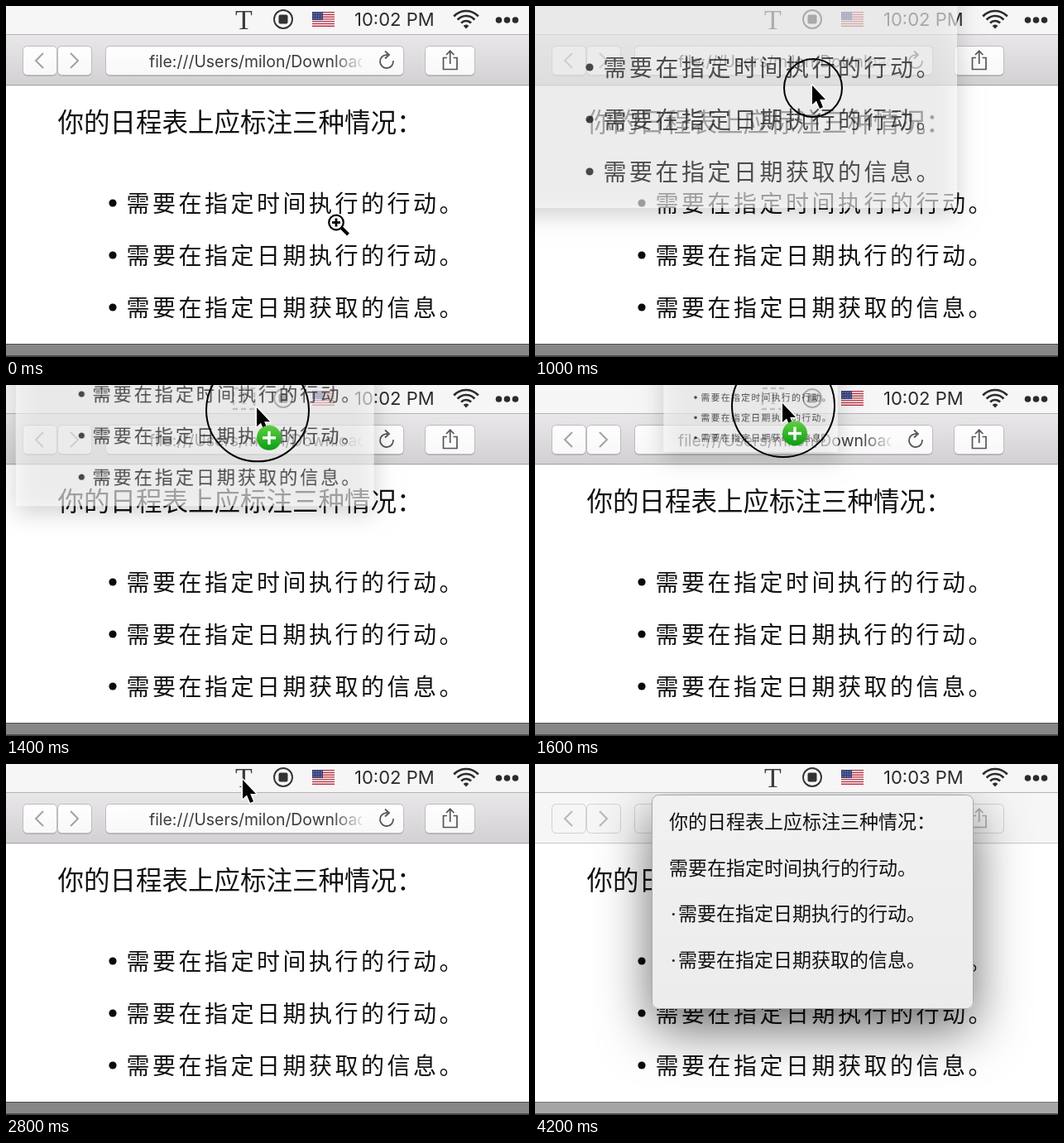
An HTML page with a canvas that plays this animation: 632 px wide and 424 px high, repeating every 4600 ms.

```html
<!DOCTYPE html>
<html lang="zh-CN">
<head>
<meta charset="utf-8">
<title>Drag to recognise text</title>
<style>
html, body { margin: 0; width: 100%; height: 100%; overflow: hidden; background: #fff; }
canvas { display: block; width: 632px; height: 424px; }
</style>
</head>
<body>
<canvas id="stage" width="632" height="424"></canvas>
<script>
const W = 632, H = 424, LOOP = 4600, STEP = 100;
const CJK = '"Noto Sans CJK SC", "Noto Sans CJK", sans-serif';
const UI = 'Inter, sans-serif';
const TITLE = '你的日程表上应标注三种情况：';
const ITEMS = ['需要在指定时间执行的行动。', '需要在指定日期执行的行动。', '需要在指定日期获取的信息。'];
const g = document.getElementById('stage').getContext('2d');

// time, pointer x y, first bullet of the dragged copy x y, its scale, ring radius
const DRAG = [
  [100, 398, 260, 129, 238, 1, 35],
  [600, 398, 203, 129, 181, 1, 35],
  [700, 398, 203, 129, 181, 1, 35],
  [1000, 335, 96, 66, 74, 1, 35],
  [1200, 312, 42, 45, 20, 1, 62],
  [1300, 305, 30, 40, 9, 1, 62],
  [1600, 299, 22, 194, 15, 0.387, 62],
  [1900, 286, 14, 187, 10, 0.387, 62],
  [2400, 286, 14, 187, 10, 0.387, 62]
];

function pose(t) {
  const i = Math.max(1, DRAG.findIndex(k => k[0] >= t));
  const a = DRAG[i - 1], b = DRAG[i];
  const u = (t - a[0]) / (b[0] - a[0]);
  return a.map((v, n) => v + (b[n] - v) * u);
}

function box(c, x, y, w, h, r, fill, line) {
  c.beginPath();
  c.roundRect(x, y, w, h, r);
  if (fill) { c.fillStyle = fill; c.fill(); }
  if (line) { c.strokeStyle = line; c.lineWidth = 1; c.stroke(); }
}

function disc(x, y, r, fill) {
  g.beginPath();
  g.arc(x, y, r, 0, 7);
  g.fillStyle = fill;
  g.fill();
}

function ring(x, y, r, width, color) {
  g.beginPath();
  g.arc(x, y, r, 0, 7);
  g.lineWidth = width;
  g.strokeStyle = color;
  g.stroke();
}

function path(points, width, color) {
  g.beginPath();
  points.forEach(([x, y]) => g.lineTo(x, y));
  g.lineWidth = width;
  g.strokeStyle = color;
  g.stroke();
}

function text(c, s, x, y, font, fill) {
  c.font = font;
  c.fillStyle = fill;
  c.fillText(s, x, y);
}

function vertical(y0, y1, a, b) {
  const f = g.createLinearGradient(0, y0, 0, y1);
  f.addColorStop(0, a);
  f.addColorStop(1, b);
  return f;
}

// The scanned page, kept as a layer because the dragged copy reuses it
function makePage() {
  const layer = document.createElement('canvas');
  layer.width = W;
  layer.height = H;
  const c = layer.getContext('2d');
  c.filter = 'blur(0.6px)';
  text(c, TITLE, 62.5, 152, '400 31.5px ' + CJK, '#111');
  c.letterSpacing = '3.5px';
  ITEMS.forEach((s, i) => {
    const y = 238 + i * 63;
    c.beginPath();
    c.arc(129, y, 4.6, 0, 7);
    c.fillStyle = '#0a0a0a';
    c.fill();
    text(c, s, 145.5, y + 10.6, '500 28px ' + CJK, '#111');
  });
  return layer;
}
const page = makePage();

function flag(x, y) {
  for (let i = 0; i < 13; i++) {
    g.fillStyle = i % 2 ? '#f3eeee' : '#b8283c';
    g.fillRect(x, y + i * 18 / 13, 27, 18 / 13);
  }
  g.fillStyle = '#37407a';
  g.fillRect(x, y, 13, 10);
  g.fillStyle = '#c9cde0';
  for (let i = 0; i < 12; i++) g.fillRect(x + 1.5 + i % 4 * 3, y + 1.5 + (i >> 2) * 3, 1, 1);
}

function menuBar(clock, target) {
  g.fillStyle = '#f6f6f6';
  g.fillRect(0, 0, W, 34);
  g.fillStyle = '#b4b4b4';
  g.fillRect(0, 34, W, 1);
  g.textAlign = 'center';
  if (target) {
    g.setLineDash([6, 4]);
    g.lineWidth = 2.5;
    g.strokeStyle = '#777';
    g.strokeRect(275, 4, 25, 25);
    g.setLineDash([]);
    text(g, 'T', 287.5, 23, '20px "Liberation Serif", serif', '#777');
  } else {
    text(g, 'T', 287.5, 28, '34px "Liberation Serif", serif', '#3c3c3c');
  }
  g.textAlign = 'left';
  ring(335, 16, 11, 1.9, '#333');
  box(g, 329.5, 10.5, 11, 11, 2, '#333');
  flag(370, 7);
  text(g, clock, 421, 24, '22px ' + UI, '#2b2b2b');
  for (const r of [8, 14, 20]) {
    g.beginPath();
    g.arc(556, 26, r, -2.4, -0.74);
    g.lineWidth = 2.7;
    g.strokeStyle = '#2b2b2b';
    g.stroke();
  }
  g.beginPath();
  g.moveTo(556, 27.5);
  g.arc(556, 27, 4.5, -2.4, -0.74);
  g.fillStyle = '#2b2b2b';
  g.fill();
  for (const x of [595.5, 605.5, 615.5]) disc(x, 17, 3.8, '#2b2b2b');
}

function toolbar(active) {
  const fill = active ? vertical(48, 84, '#fefefe', '#f8f8f8') : '#f6f6f6';
  const line = active ? '#bdbbbd' : '#d2d2d2';
  const ink = active ? '#555' : '#b0b0b0';
  g.fillStyle = active ? vertical(35, 96, '#e9e7e9', '#d2d0d2') : '#f6f6f6';
  g.fillRect(0, 35, W, 61);
  g.fillStyle = active ? '#aaa8aa' : '#cfcfcf';
  g.fillRect(0, 95, W, 1.5);
  for (const [x, w] of [[20.5, 41], [62.5, 41], [120.5, 360], [506.5, 60]]) {
    if (active) box(g, x, 49.5, w, 35.5, 5, '#b5b3b5');
    box(g, x, 48.5, w, 35, 5, fill, line);
  }
  const arrow = active ? '#a2a2a2' : '#b8b8b8';
  path([[45, 57], [36, 66], [45, 75]], 2, arrow);
  path([[78, 57], [87, 66], [78, 75]], 2, arrow);

  const fade = g.createLinearGradient(395, 0, 430, 0);
  fade.addColorStop(0, active ? '#3c3c3c' : '#999');
  fade.addColorStop(1, 'rgba(90,90,90,.15)');
  g.save();
  g.beginPath();
  g.rect(120, 48, 310, 36);
  g.clip();
  text(g, 'file:///Users/milon/Downloads', 173, 73.5, '19.4px ' + UI, fade);
  g.restore();

  g.beginPath();
  g.arc(460, 67, 8, -0.1, 4.9);
  g.lineWidth = 1.8;
  g.strokeStyle = ink;
  g.stroke();
  path([[458, 54.5], [463, 59], [458, 63.5]], 1.8, ink);
  path([[533, 62.5], [528.5, 62.5], [528.5, 76.5], [545, 76.5], [545, 62.5], [540.5, 62.5]], 1.7, ink);
  path([[536.7, 70], [536.7, 54.5]], 1.7, ink);
  path([[532, 59], [536.7, 54.3], [541.4, 59]], 1.7, ink);
}

function windowBody(active) {
  g.fillStyle = '#fff';
  g.fillRect(0, 96.5, W, 312);
  g.drawImage(page, 0, 0);
  g.fillStyle = active ? '#4c4c4c' : '#777';
  g.fillRect(0, 408, W, 1);
  g.fillStyle = active ? '#878787' : '#a6a6a6';
  g.fillRect(0, 409, W, 13);
  g.fillStyle = '#4a4446';
  g.fillRect(0, 422, W, 2);
}

function ghost(bx, by, k) {
  g.save();
  g.translate(bx, by);
  g.scale(k, k);
  g.translate(-129, -238);
  g.save();
  g.shadowColor = 'rgba(0,0,0,.3)';
  g.shadowBlur = 26;
  g.shadowOffsetY = 8;
  g.fillStyle = 'rgba(255,255,255,.6)';
  g.fillRect(29, 97, 544, 311);
  g.restore();
  g.globalAlpha = 0.72;
  g.imageSmoothingQuality = 'high';
  g.drawImage(page, 0, 0);
  g.restore();
}

function pointer(x, y) {
  const shape = [[0, 0], [0, 23], [5, 18.5], [9, 28], [13, 26.2], [9.2, 17], [16, 17]];
  g.beginPath();
  shape.forEach(([dx, dy]) => g.lineTo(x + dx, y + dy));
  g.closePath();
  g.lineJoin = 'round';
  g.lineWidth = 3;
  g.strokeStyle = '#fff';
  g.stroke();
  g.fillStyle = '#000';
  g.fill();
  g.lineJoin = 'miter';
}

function badge(x, y) {
  disc(x, y, 15, vertical(y - 15, y + 15, '#5fcf42', '#0b9d12'));
  path([[x - 8, y], [x + 8, y]], 3.4, '#fff');
  path([[x, y - 8], [x, y + 8]], 3.4, '#fff');
}

function magnifier(x, y) {
  path([[x + 6, y + 6], [x + 15, y + 15]], 6.5, '#fff');
  disc(x, y, 11, '#fff');
  path([[x + 6, y + 6], [x + 14.5, y + 14.5]], 4, '#000');
  ring(x, y, 8.8, 2.2, '#000');
  path([[x - 5, y], [x + 5, y]], 2.8, '#000');
  path([[x, y - 5], [x, y + 5]], 2.8, '#000');
}

function popup(alpha) {
  g.save();
  g.globalAlpha = alpha;
  g.beginPath();
  g.rect(0, 35, W, H);
  g.clip();
  g.save();
  g.shadowColor = 'rgba(0,0,0,.58)';
  g.shadowBlur = 62;
  g.shadowOffsetY = 24;
  box(g, 141, 37, 389, 259, 8, '#eee');
  g.restore();
  box(g, 141.5, 37.5, 388, 258, 8, vertical(37, 296, '#f1f1f1', '#ececec'), '#a9a9a9');
  const font = '23px ' + CJK;
  [TITLE, ...ITEMS].forEach((s, i) => {
    const y = 78 + i * 55.7, dot = i > 1;
    if (dot) text(g, '·', 164, y, '23px ' + UI, '#111');
    text(g, s, dot ? 173 : 162, y, font, '#111');
  });
  g.restore();
}

function draw(t) {
  const dragging = t >= 100 && t < 2400;
  const active = t < 3800;
  g.clearRect(0, 0, W, H);
  toolbar(active);
  windowBody(active);
  menuBar(t < 3400 ? '10:02 PM' : '10:03 PM', t >= 1200 && dragging);
  if (t < 100) magnifier(399, 261.5);
  if (dragging) {
    const [, x, y, bx, by, k, r] = pose(t);
    ghost(bx, by, k);
    ring(x + 1, y + 3, r, 2, '#000');
    pointer(x, y);
    if (t >= 1100) badge(x + 15, y + 36.5);
  } else if (t >= 2400 && t < 3400) {
    pointer(286, 19);
  }
  if (!active) popup(t < 3900 ? 0.5 : 1);
}

const start = performance.now();
function tick() {
  const t = (performance.now() - start) % LOOP;
  draw(Math.floor(t / STEP) * STEP);
  requestAnimationFrame(tick);
}
tick();
</script>
</body>
</html>
```
